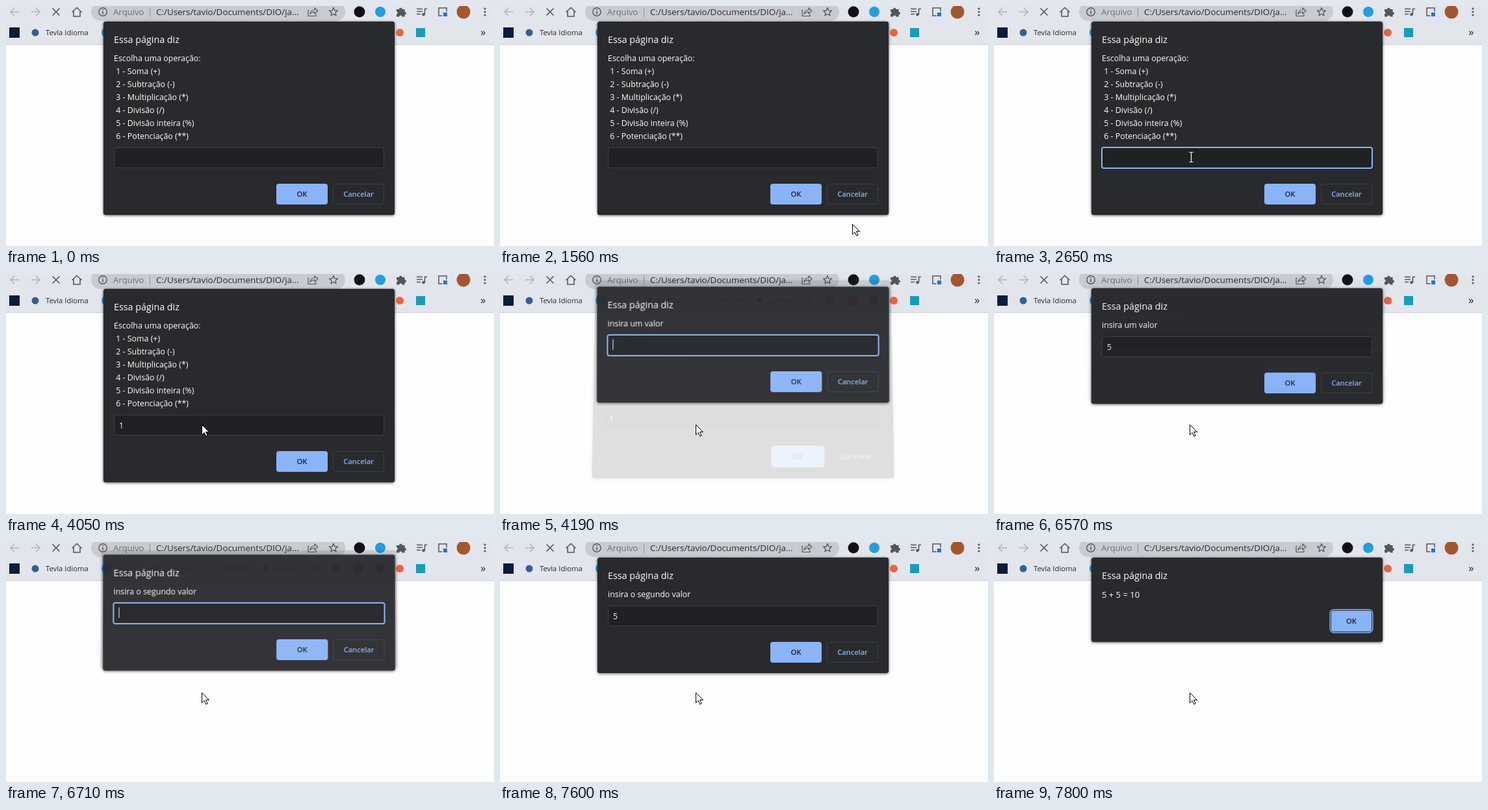
An HTML page for the animation above (8 s loop, 751 px wide and 370 px high).

```html
<!DOCTYPE html>
<html lang="pt">
<head>
<meta charset="utf-8">
<style>
html, body { margin: 0; width: 100%; height: 100%; overflow: hidden; background: #fefefe; }
body, text { font-family: "Open Sans", "Noto Sans", sans-serif; }
svg { position: absolute; left: 0; top: 0; }
.dialog {
  position: absolute; left: 150px; top: 24px; width: 448px; border-radius: 4px;
  background: #292a2d; color: #fff; box-shadow: 0 1px 4px rgba(0,0,0,.65), 0 0 1px #222;
}
.dialog div { position: absolute; box-sizing: border-box; }
.title { left: 16px; top: 18px; font-size: 14.3px; line-height: 20px; }
.message { left: 16px; top: 47px; font-size: 12.4px; line-height: 20px; white-space: pre; }
.field {
  left: 16px; width: 416px; height: 32px; padding-left: 7px; display: flex; align-items: center;
  border: 1px solid #3c4043; border-radius: 3px; background: #202124; font-size: 12.3px;
}
.field i { width: 1px; height: 16px; margin-bottom: 2px; background: #f1f3f4; }
.focus { border-color: #8ab4f8; box-shadow: 0 0 0 1px #8ab4f8; }
.button {
  width: 79px; height: 32px; border-radius: 4px; text-align: center;
  font-size: 11.3px; line-height: 31px; background: #8ab4f8; color: #202124; font-weight: 600;
}
.cancel { background: none; border: 1px solid #3c4043; color: #8ab4f8; font-size: 11.1px; line-height: 30px; }
.alert { width: 62px; box-shadow: 0 0 0 1px #292a2d, 0 0 0 2.5px #8ab4f8; }
</style>
</head>
<body>
<svg width="751" height="370" fill="none" stroke="#54565b" stroke-width="1.6">
  <path d="M0 0H751V59H0z" fill="#e3e5ed" stroke="none"/>
  <path d="M0 59.5H751" stroke="#cdd0d6" stroke-width="1"/>
  <path d="M20 9H7m6-6l-6 6 6 6M39 9h13m-6-6l6 6-6 6" stroke="#b2b4ba"/>
  <path d="M71.500 3.500l11 11m0-11l-11 11M101.500 9.500L109 2.500l7.500 7M104 8v8h10V8"/>
  <rect x="131" y="-5" width="391" height="28" rx="14" fill="#c9cbd2" stroke="none"/>
  <circle cx="149" cy="9" r="6.200" stroke-width="1.400"/>
  <path d="M149 8v4.500M149 5v1.600"/>
  <path d="M221.500 2v15" stroke="#8d9097" stroke-width="1"/>
  <path d="M466.500 6.500h-1.500v9h12v-3M468 12q1-6 7-6V3l5 4.500-5 4.500V9q-4 0-7 3z" stroke-width="1.200"/>
  <path d="M504 2.800l1.900 4 4.400.5-3.300 3 .9 4.300-3.900-2.200-3.900 2.200.9-4.300-3.300-3 4.400-.5z" stroke-width="1.300"/>
  <g stroke="none">
    <circle cx="544" cy="9" r="8.500" fill="#101114"/>
    <circle cx="576" cy="9" r="8" fill="#209fe2"/>
    <path d="M601 5h4a2.300 2.300 0 1 1 4.600 0h4v4a2.300 2.300 0 1 1 0 4.600v3h-4a2.200 2.200 0 0 0-4.400 0h-4.200v-4a2.300 2.300 0 0 0 0-4.400z" fill="#54565b"/>
    <circle cx="704" cy="9" r="10.500" fill="#a4562f"/>
    <g fill="#54565b"><circle cx="737" cy="4" r="1.600"/><circle cx="737" cy="9" r="1.600"/><circle cx="737" cy="14" r="1.600"/></g>
    <circle cx="642.500" cy="13" r="2.300" fill="#54565b"/>
  </g>
  <path d="M632 4.500h9M632 8.500h9M632 12.500h6M644.500 13V4.500h3.500"/>
  <path d="M671.500 15H666V3h12v5.500" stroke-width="1.500"/>
  <path d="M673 10h6v6h-6z" fill="#2674d9" stroke="none"/>
  <g stroke="none">
    <path d="M5 33h16v16H5z" fill="#0b1c3a"/>
    <circle cx="45" cy="41" r="5.500" fill="#345f94"/>
    <circle cx="155" cy="41" r="8" fill="#209fe2"/>
    <circle cx="228" cy="41" r="6" fill="#4d78ad"/>
    <circle cx="400" cy="41" r="5" fill="#55606e"/>
    <circle cx="478" cy="41" r="6" fill="#d5ab57"/>
    <circle cx="508" cy="41" r="7" fill="#2c8792"/>
    <circle cx="542" cy="41" r="8" fill="#e13030"/>
    <circle cx="574" cy="41" r="7" fill="#c92d3b"/>
    <circle cx="606" cy="41" r="6" fill="#ee623b"/>
    <path d="M631 34h14v14h-14z" fill="#159eb7"/>
  </g>
  <g stroke="none" fill="#26282c" font-size="11.300">
    <text x="165" y="14" font-size="13.200" fill="#6b6e75">Arquivo</text>
    <text x="231" y="14" font-size="13.400">C:/Users/tavio/Documents/DIO/ja...</text>
    <text x="61" y="45">Tevla Idioma</text>
    <text x="171" y="45">LUO</text>
    <text x="240" y="45">Kit Apps</text>
    <text x="328" y="45">UNIVESP</text>
    <text x="413" y="45">python</text>
    <text x="730" y="46" font-size="17">»</text>
  </g>
</svg>
<main></main>
<svg width="751" height="370">
  <path id="arrow" d="M.5.500v15.500l3.600-3.500 2.700 5.700 2.400-1.100-2.700-5.600h5z" fill="#fff" stroke="#000"/>
  <path id="beam" d="M-3-7.500h2.500l.5.500.500-.5H3M-3 7.500h2.500l.5-.5.500.5H3M0-7V7" fill="none" stroke="#fff" stroke-width="1.200"/>
</svg>
<script>
const LOOP = 8000;
const menu = `Escolha uma operação:
 1 - Soma (+)
 2 - Subtração (-)
 3 - Multiplicação (*)
 4 - Divisão (/)
 5 - Divisão inteira (%)
 6 - Potenciação (**)`;

// Field states: time, text, caret visible, focused
const dialogs = [
  { message: menu, height: 298, field: [
    [0, '', 0, 0], [2190, '', 1, 1], [2650, '', 0, 1], [3200, '', 1, 1], [3590, '1', 1, 1], [4050, '1', 0, 0]] },
  { message: 'insira um valor', height: 178, field: [
    [0, '', 1, 1], [4590, '', 0, 1], [5110, '', 1, 1], [5640, '', 0, 1], [5970, '5', 1, 1], [6500, '5', 0, 0]] },
  { message: 'insira o segundo valor', height: 178, field: [
    [0, '', 1, 1], [7110, '', 0, 1], [7200, '5', 1, 1], [7600, '5', 0, 0]] },
  { message: '5 + 5 = 10', height: 130 }
];

// Time, dialog, its lift and opacity, then lift and opacity of the next dialog
const steps = [
  [0, 0, 0, 1], [4050, 0, .08, 1], [4120, 0, .45, .65, .8, .4], [4190, 0, 1, .15, .33, .95],
  [4260, 1, 0, 1], [6570, 1, .16, 1, 1, .03], [6640, 1, .45, .65, .8, .45], [6710, 1, .8, .15, .33, .95],
  [6780, 2, 0, 1], [7670, 2, .35, .7, .8, .35], [7740, 2, .75, .2, .33, .93],
  [7800, 3, 0, 1]
];

const find = id => document.getElementById(id);
const current = (list, t) => list.filter(item => item[0] <= t).pop();

function build(dialog) {
  const { message, height, field } = dialog;
  const el = dialog.el = document.createElement('div');
  el.className = 'dialog';
  el.style.height = height + 'px';
  const buttonTop = height - 48;
  const button = (left, label, type) =>
    `<div class="button ${type}" style="left:${left}px;top:${buttonTop}px">${label}</div>`;
  el.innerHTML = `<div class="title">Essa página diz</div><div class="message">${message}</div>` + (field
    ? `<div class="field" style="top:${height - 104}px"><span></span><i></i></div>`
      + button(266, 'OK', '') + button(353, 'Cancelar', 'cancel')
    : button(369, 'OK', 'alert'));
  if (!field) el.querySelector('.message').style.fontSize = '13px';
  document.querySelector('main').append(el);
}

// A lifted dialog rises, grows and leans back
function pose({ el }, lift, opacity) {
  el.style.display = opacity ? '' : 'none';
  el.style.opacity = opacity;
  el.style.transform = lift
    ? `translateY(${-12.5 * lift}px) perspective(1000px) scale(${1 + .026 * lift ** 2}) rotateX(${4.4 * lift ** 2}deg)`
    : 'none';
}

function fill({ el, field }, t) {
  if (!field) return;
  const [, text, caret, focus] = current(field, t);
  el.querySelector('span').textContent = text;
  el.querySelector('i').style.opacity = caret;
  el.querySelector('.field').classList.toggle('focus', !!focus);
}

function moveCursor(t) {
  const step = Math.floor((t - 1430) / 69);
  const left = (1 - Math.min(1, Math.max(0, step / 10))) ** 2;
  const x = Math.round(301 + 298 * left), y = Math.round(232 + 128 * left);
  const beam = t < 4050 && x < 582 && y < 250;
  const show = (id, on, dx, dy) => {
    find(id).style.display = on && t >= 1430 ? '' : 'none';
    find(id).setAttribute('transform', `translate(${x + dx} ${y + dy})`);
  };
  show('arrow', !beam, 0, 0);
  show('beam', beam, 2.5, 1);
}

function draw(now) {
  const t = now % LOOP;
  const [, index, lift, opacity, nextLift = 0, nextOpacity = 0] = current(steps, t);
  dialogs.forEach((dialog, i) => {
    if (i === index) pose(dialog, lift, opacity);
    else if (i === index + 1) pose(dialog, nextLift, nextOpacity);
    else pose(dialog, 0, 0);
    fill(dialog, t);
  });
  moveCursor(t);
}

dialogs.forEach(build);
const start = performance.now();
function tick() {
  draw(performance.now() - start);
  requestAnimationFrame(tick);
}
tick();
</script>
</body>
</html>
```
